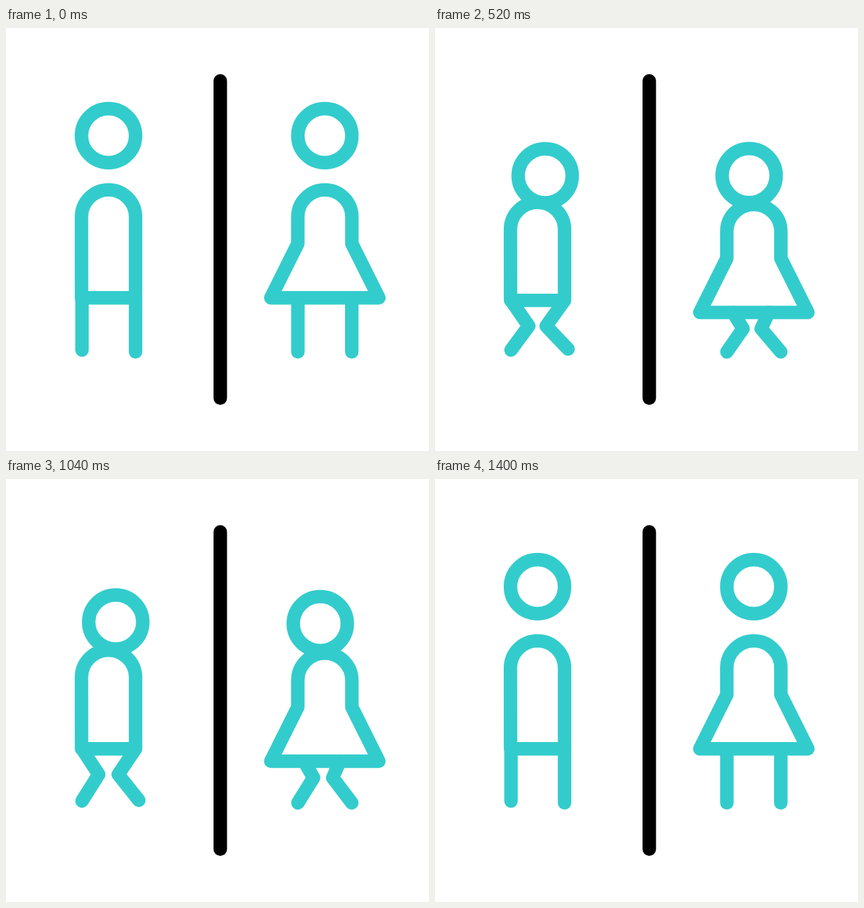
An HTML page with a canvas for the animation above (1480 ms loop, 640 px wide and 640 px high).

```html
<!DOCTYPE html>
<html lang="en">
<head>
<meta charset="utf-8">
<title>Restroom sign</title>
<style>
html, body { margin: 0; width: 100%; height: 100%; overflow: hidden; background: #fff; }
canvas { display: block; width: 100vmin; height: 100vmin; }
</style>
</head>
<body>
<canvas id="stage" width="640" height="640"></canvas>
<script>
const ctx = document.getElementById('stage').getContext('2d');
const LOOP = 1480, STEP = 40, R = 40.9;
const TEAL = '#33cccc';

const ease = (t, from, to) => {
  const x = Math.min(1, Math.max(0, (t - from) / (to - from)));
  return x * x * (3 - 2 * x);
};
const mix = (a, b, p) => a + (b - a) * p;

function line(...points) {
  ctx.beginPath();
  points.forEach(([x, y]) => ctx.lineTo(x, y));
  ctx.stroke();
}

function head(x, y) {
  ctx.beginPath();
  ctx.arc(x, y, R, 0, Math.PI * 2);
  ctx.stroke();
}

// p: 0 standing, 1 knees together; dip: extra squat in pixels
function man(p, dip) {
  const hip = 408.2 + dip, knee = 447 + dip;
  head(mix(155.1, 166.7, p), mix(162.9, 219.7, p) + dip);
  ctx.beginPath();
  ctx.moveTo(114.3, hip);
  ctx.arc(155.1, mix(285.8, 300.9, p) + dip, R, Math.PI, 0);
  ctx.lineTo(196, hip);
  ctx.closePath();
  ctx.stroke();
  line([115, hip], [mix(115, 141.8, p), knee], [115, 487.2]);
  line([196, hip], [mix(196, 168.2, p), knee], [mix(196, 201.3, p), mix(490, 485.8, p)]);
}

function woman(p, dip) {
  const drop = 19.3 * p + dip, hem = 408.2 + drop, knee = 452 + dip;
  head(mix(482.4, 475.3, p), mix(162.9, 220.4, p) + dip);
  ctx.beginPath();
  ctx.moveTo(400.6, hem);
  ctx.lineTo(441.5, 326.4 + drop);
  ctx.arc(482.4, 285.8 + drop, R, Math.PI, 0);
  ctx.lineTo(523.3, 326.4 + drop);
  ctx.lineTo(564.2, hem);
  ctx.closePath();
  ctx.stroke();
  line([mix(441.6, 451, p), hem], [mix(441.6, 466, p), knee], [441.6, 490]);
  line([mix(523.2, 504.7, p), hem], [mix(523.2, 493.5, p), knee], [523.2, 490]);
}

function draw(t) {
  ctx.fillStyle = '#fff';
  ctx.fillRect(0, 0, 640, 640);
  ctx.lineWidth = 20.4;
  ctx.lineCap = ctx.lineJoin = 'round';

  ctx.strokeStyle = '#000';
  line([324.2, 80], [324.2, 560]);

  ctx.strokeStyle = TEAL;
  const bend = ease(t, 120, 400);
  const dip = ease(t, 400, 640) - ease(t, 640, 840);
  man(bend - ease(t, 982, 1378), 7.8 * dip);
  woman(bend - ease(t, 1000, 1400), 5.8 * dip);
}

const start = performance.now();
function tick() {
  const t = (performance.now() - start) % LOOP;
  draw(Math.floor(t / STEP) * STEP);
  requestAnimationFrame(tick);
}
tick();
</script>
</body>
</html>
```
